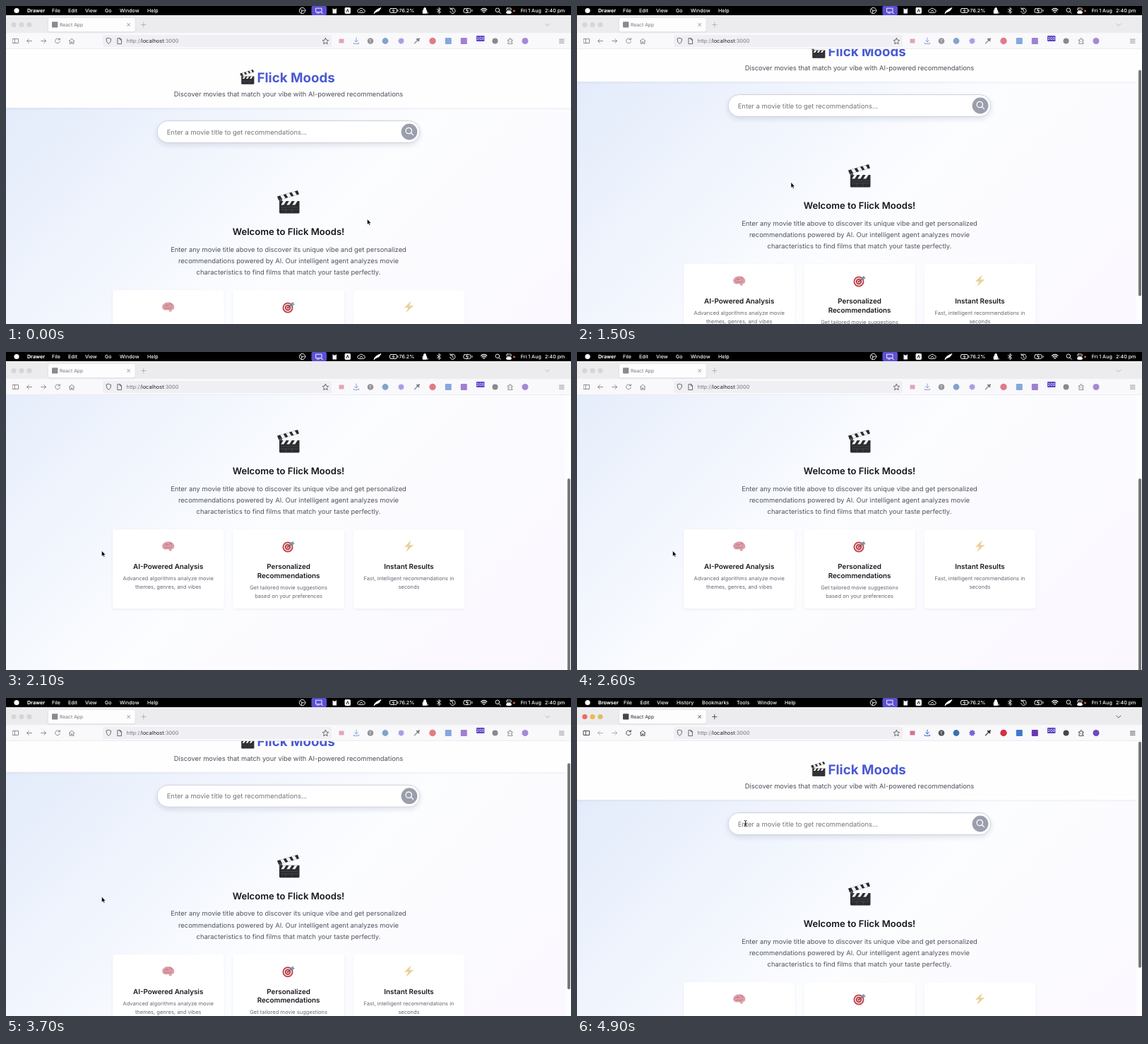
Write an HTML page that moves like this. It is 800x450 px and loops after 5000 ms.

```html
<!DOCTYPE html>
<html lang="en">
<head>
<meta charset="utf-8">
<title>React App</title>
<style>
html, body { margin: 0; width: 100%; height: 100%; overflow: hidden; background: #fff; }
svg { display: block; width: 100%; height: 100%; }
text { font-family: Inter, "Open Sans", sans-serif; white-space: pre; text-rendering: geometricPrecision; }
.mid { text-anchor: middle; }
.line { fill: none; stroke-linecap: round; stroke-linejoin: round; }
</style>
</head>
<body>
<svg id="stage" viewBox="0 0 800 450">
  <defs>
    <linearGradient id="sky" gradientUnits="userSpaceOnUse" x1="52" y1="9" x2="748" y2="705">
      <stop offset="0" stop-color="#e0e9fa"/>
      <stop offset=".5" stop-color="#fcfdff"/>
      <stop offset="1" stop-color="#faf6fe"/>
    </linearGradient>
    <filter id="soft" x="-20%" y="-20%" width="140%" height="160%">
      <feDropShadow dx="0" dy="1.2" stdDeviation="1.5" flood-color="#30406a" flood-opacity=".08"/>
    </filter>
    <filter id="lift" x="-10%" y="-30%" width="120%" height="200%">
      <feDropShadow dx="0" dy="3" stdDeviation="3" flood-color="#30406a" flood-opacity=".14"/>
    </filter>
    <clipPath id="slate"><path d="M3 15H31.5V20.5H3Z"/></clipPath>
    <clipPath id="arm"><path d="M0 8.5L29 0L31 5.5L2 14Z"/></clipPath>
    <symbol id="clapper" viewBox="0 0 32 33" overflow="visible">
      <path d="M3 15H31.5V31Q31.5 32.5 30 32.5H4.5Q3 32.5 3 31Z" fill="#2b2c2f"/>
      <path d="M0 8.5L29 0L31 5.5L2 14Z" fill="#292a2d"/>
      <g fill="#f2f2f2">
        <path clip-path="url(#slate)" d="M5 21L9 14.5H13L9 21ZM13 21L17 14.5H21L17 21ZM21 21L25 14.5H29L25 21Z"/>
        <path clip-path="url(#arm)" d="M3.5 6L8 5L13 13L8 14ZM11.5 4L16 2L21 10L16 11ZM19.5 1L24 0L29 8L24 9Z"/>
      </g>
      <path d="M2 13L7 11.5V15.5H3Z" fill="#55575b"/>
      <path class="line" d="M5 23.7H29.5M5 27H29.5M12 27V31M21 27V31" stroke="#5c5e62" stroke-width=".5"/>
    </symbol>
  </defs>

  <g id="page">
    <rect y="61" width="800" height="660" fill="url(#sky)"/>
    <rect x="-10" y="0" width="820" height="144" fill="#fefefe" filter="url(#soft)"/>
    <use href="#clapper" x="331" y="90" width="21" height="21"/>
    <text x="355.5" y="107.5" font-size="18.76" font-weight="700" fill="#4a5ad2">Flick Moods</text>
    <text class="mid" x="400" y="128.3" font-size="9.38" fill="#4a4f59">Discover movies that match your vibe with AI-powered recommendations</text>

    <rect x="214" y="162.5" width="372" height="31" rx="15.5" fill="#fff" stroke="#ced1db" filter="url(#lift)"/>
    <text x="227.7" y="181.6" font-size="9.42" fill="#747579">Enter a movie title to get recommendations...</text>
    <circle cx="571" cy="178" r="11.4" fill="#9b9eac"/>
    <path class="line" d="M574.5 176.5a4.2 4.2 0 1 1-8.4 0a4.2 4.2 0 1 1 8.4 0M573.4 179.5L576.5 182.6" stroke="#fff" stroke-width="1.3"/>

    <use href="#clapper" x="384" y="261" width="32" height="33"/>
    <text class="mid" x="400" y="324.4" font-size="13.1" font-weight="600" fill="#15171c">Welcome to Flick Moods!</text>
    <g id="intro" font-size="9.38" fill="#4f545e"></g>
    <g id="cards"></g>

    <g transform="translate(229.7 426)">
      <path d="M-8.5 .5C-9-4-4-7 0-6.8C5-7 8.8-3.5 8.6 0C8.8 3 6.5 4 5 4L4.6 6.8L1.5 6.3L.5 4C-4 5.2-8 4-8.5 .5Z" fill="#dfa0a9"/>
      <path class="line" d="M-6 0Q-4-3.5-2-2T2-3.5M-5 2.5Q-2 0 0 1.8T5 0M2-5.5Q6-4.5 5-2M-3-4.5L-1-2.7" stroke="#b2697a" stroke-width=".8"/>
    </g>
    <g transform="translate(399 427)">
      <circle r="7.5" fill="#c0424a"/><circle r="5.7" fill="#efe4e4"/>
      <circle r="4.2" fill="#c0424a"/><circle r="2.2" fill="#efe4e4"/><circle r="1.2" fill="#b52733"/>
      <path d="M0 0L6-5" stroke="#4f5360" stroke-width="1.1"/>
      <path d="M4-4L5-7L8-8L8-6L10-5L7-3Z" fill="#6f9cb5"/>
    </g>
    <path d="M573.5 417.5L563.8 427.3L569.5 426.5L566.3 434L577.5 423.7L571.5 424.5Z" fill="#ebd09a"/>
  </g>

  <g id="scrollbar">
    <rect x="791" y="61" width="9" height="389" fill="#fff" opacity=".6"/>
    <rect id="thumb" x="795" width="4" height="320" rx="2" fill="#77777a"/>
  </g>

  <g id="chrome">
    <rect y="13" width="800" height="25.5" fill="#ececee"/>
    <rect width="800" height="13" fill="#000"/>
    <rect y="38" width="800" height="22.5" fill="#f9f9fb"/>
    <path d="M0 60.5H800" stroke="#e9e9ed" stroke-width=".7"/>
    <rect x="60" y="17" width="122.5" height="19" rx="2.5" fill="#fdfdfe" filter="url(#soft)"/>
    <rect x="137" y="41" width="324" height="17" rx="2.5" fill="#f0f0f4"/>
    <g id="lights"></g>
    <path id="stripIcons" class="line" stroke="#36363f" stroke-width=".9" d="M191.5 26.5h6.5m-3.25-3.25v6.5M763.8 25.2l3 2.8l3-2.8"/>
    <g id="tools">
      <rect x="65" y="22.3" width="8.3" height="8.3" rx="1" fill="#45474d"/>
      <text x="76" y="29" font-size="6.8" fill="#24242b">React App</text>
      <path class="line" stroke="#36363f" stroke-width=".9" d="M171.8 24.7l3.6 3.6m0-3.6l-3.6 3.6
        M9.5 46.5h8v6h-8zM12.3 46.5v6M783.5 47.2h6.5m-6.5 2.5h6.5m-6.5 2.5h6.5
        M76 47.6a3.4 3.4 0 1 0 .4 2.6M76.3 45.5v2.3h-2.3M89.3 49.5l3.8-3.3l3.8 3.3M90.3 49v4.3h2v-2.5h1.6v2.5h2V49"/>
      <path class="line" id="arrows" stroke="#36363f" stroke-width=".9" d="M36.5 49.5h-6.8m2.8-2.8l-2.8 2.8l2.8 2.8M49.8 49.5h6.8m-2.8-2.8l2.8 2.8l-2.8 2.8"/>
      <path d="M471.5 46.5h7v6h-7z" fill="#d2738c"/>
      <path class="line" stroke="#496bd0" d="M496 45v6m-2.4-2.4l2.4 2.4l2.4-2.4M492.5 52v1.5h7V52"/>
      <circle cx="516" cy="49.5" r="4.3" fill="#55565b"/>
      <text class="mid" x="516" y="51.7" font-size="6" fill="#fff">T</text>
      <circle cx="537" cy="49.5" r="4.4" fill="#3c6fae"/>
      <circle cx="559.5" cy="49.5" r="3.4" fill="#7566d8" stroke="#7566d8" stroke-width="2" stroke-dasharray="1.3 1.3"/>
      <path class="line" d="M578.5 52.8l4.5-4.5" stroke="#53545b" stroke-width="1.5"/>
      <path class="line" d="M582 46.8l2.5 2.5m-1-1.5l1.5-1.5" stroke="#2c2d33" stroke-width="2"/>
      <circle cx="604" cy="49.5" r="4.7" fill="#d32f44"/>
      <rect x="621.8" y="45" width="9" height="9" rx="1" fill="#3f78cc"/>
      <rect x="643.8" y="45" width="9" height="9" rx="1" fill="#6a37b8"/>
      <circle cx="692.5" cy="49.5" r="4" fill="#4c4349"/>
      <path class="line" stroke="#46464f" stroke-width=".9" d="M710.8 47.8h2q-.8-2.3 1-2.3t1 2.3h2.2v2q-2-.7-2 1t2 1v1.7h-6.2v-2q1.8.2 1.8-1.1t-1.8-1z"/>
      <circle cx="735" cy="49.5" r="4.5" fill="#7047c2"/>
    </g>
    <path class="line" stroke="#46464f" stroke-width=".8" d="M452.4 45.4l1.3 2.7l3 .4l-2.2 2.1l.6 3l-2.7-1.4l-2.7 1.4l.6-3l-2.2-2.1l3-.4z
      M145.3 45.3l3.3 1.2q.2 5.3-3.3 7q-3.5-1.7-3.3-7zM158.3 45.6h3.2l2 2v6h-5.2zM161.3 45.6v2.2h2.2"/>
    <text x="170.5" y="52.2" font-size="7.45" fill="#77777d">http://<tspan fill="#25252c">localhost</tspan>:3000</text>
    <rect x="666" y="42" width="11.5" height="8" rx="1" fill="#5942c5"/>
    <text class="mid" x="671.8" y="48.3" font-size="5.8" fill="#fff">200</text>

    <circle cx="15" cy="6.5" r="3.6" fill="#fff"/>
    <g id="menu" font-size="7.1" font-weight="500" fill="#fff"></g>
    <rect x="432.5" y="0" width="21.5" height="13" rx="2" fill="#5d50d2"/>
    <g class="line" stroke="#fff" stroke-width=".9">
      <circle cx="419.5" cy="6.5" r="4.2"/><path d="M417 4l2 3l3-.5M419 7l-1 3"/>
      <path d="M439 3.2h8v5.5h-8zM440.5 10h3m3-.5l2 1"/>
      <rect x="480" y="2.5" width="7.5" height="8" rx="1" fill="#fff"/>
      <path d="M482 8.5l1.7-4l1.7 4" stroke="#000"/>
      <path d="M500 9.5a2.3 2.3 0 0 1 0-4.6q3-3.5 6 0a2.3 2.3 0 0 1 0 4.6zM501 8q2-4 4 0"/>
      <path d="M521 10.5q1-5 10-8q-2 5-7 6z" fill="#fff"/>
      <rect x="543.5" y="3.5" width="10" height="6" rx="1.5"/><path d="M549 4.5l-2 2.2h3l-2 2.2M555 5.5v2"/>
      <path d="M590.5 6h5v4.3h-5zM591.5 6V4a1.5 1.5 0 0 1 3 0v2M597 8.5v2" fill="#fff"/>
      <path d="M610.5 4.5l5 4l-2.5 2V2.5l2.5 2l-5 4M629.5 4.3a3.7 3.7 0 1 1-.8 3.2M629 2.5v2h2M632 4.5v2.5l1.5 1"/>
      <rect x="648" y="3.8" width="10" height="5.5" rx="1.3"/><path d="M653.5 3l-2 3.5h3l-2 3.5M660 5.5v2"/>
      <path stroke-width="1.2" d="M672.5 5.2q4.2-3.8 8.4 0M674 7q2.7-2.4 5.4 0M675.7 8.8q1-.8 2 0"/>
      <path d="M698.7 5.8a2.8 2.8 0 1 1-5.6 0a2.8 2.8 0 1 1 5.6 0M698 8l2.2 2.3"/>
      <rect x="708.5" y="3" width="7" height="3" rx="1.5"/><rect x="708.5" y="7.5" width="7" height="3" rx="1.5" fill="#fff"/>
    </g>
    <path d="M462.5 10.5V3l1.5 1.5h2.5L468 3v7.5Z" fill="#fff"/>
    <circle cx="719.5" cy="7" r="1.4" fill="#e5684d"/>
    <g font-size="7.1" font-weight="500" fill="#fff">
      <text x="556.5" y="9.1">76.2%</text>
      <text x="728.8" y="9.1">Fri 1 Aug</text>
      <text x="763" y="9.1">2:40 pm</text>
    </g>
  </g>

  <path id="arrow" d="M0 0V7.8L1.8 6.2L3 8.8L4.3 8.2L3.1 5.8H5.4Z" fill="#000" stroke="#fff" stroke-width=".5"/>
  <path id="beam" class="line" d="M-1.6-4Q0-4 0-3Q0-4 1.6-4M0-3V3M-1.6 4Q0 4 0 3Q0 4 1.6 4M-1 1H1" stroke="#111" stroke-width=".9"/>
</svg>

<script>
const el = id => document.getElementById(id);
const move = (node, x, y) => node.setAttribute('transform', `translate(${x} ${y})`);
const show = (node, visible) => node.setAttribute('visibility', visible ? 'visible' : 'hidden');
const fade = (id, opacity) => el(id).setAttribute('opacity', opacity);
const centered = (lines, x, y, step) => lines.map((line, i) =>
  `<text class="mid" x="${x}" y="${y + i * step}">${line}</text>`).join('');

el('intro').innerHTML = centered([
  'Enter any movie title above to discover its unique vibe and get personalized',
  'recommendations powered by AI. Our intelligent agent analyzes movie',
  'characteristics to find films that match your taste perfectly.'
], 400, 347.7, 16.2);

const cards = [
  [['AI-Powered Analysis'], ['Advanced algorithms analyze movie', 'themes, genres, and vibes']],
  [['Personalized', 'Recommendations'], ['Get tailored movie suggestions', 'based on your preferences']],
  [['Instant Results'], ['Fast, intelligent recommendations in', 'seconds']]
];
el('cards').innerHTML = cards.map(([title, body], i) => {
  const x = 229.7 + i * 170.4;
  return `<rect x="${x - 78.7}" y="402" width="157.4" height="112" rx="4.5" fill="#fff" filter="url(#soft)"/>
    <g font-size="9.85" font-weight="600" fill="#17191e">${centered(title, x, 458, 12.6)}</g>
    <g font-size="7.52" fill="#666b75">${centered(body, x, 461.5 + title.length * 12.6, 11.8)}</g>`;
}).join('');

const menus = {
  idle: [['Drawer', 30], ['File', 65], ['Edit', 88], ['View', 112], ['Go', 140], ['Window', 161], ['Help', 200]],
  active: [['Browser', 30], ['File', 66], ['Edit', 89.5], ['View', 113], ['History', 141], ['Bookmarks', 177],
    ['Tools', 226], ['Window', 255.5], ['Help', 294]]
};
let focus;
function setFocus(active) {
  if (focus === active) return;
  focus = active;
  el('menu').innerHTML = menus[active ? 'active' : 'idle'].map(([label, x], i) =>
    `<text x="${x}" y="9.1" font-weight="${i ? 500 : 700}">${label}</text>`).join('');
  const colors = active ? ['#ec6a5f', '#f1b84c', '#d5c267'] : ['#d6d6da', '#d6d6da', '#d6d6da'];
  el('lights').innerHTML = colors.map((c, i) => `<circle cx="${11 + i * 11}" cy="26.5" r="3.6" fill="${c}"/>`).join('');
  fade('tools', active ? 1 : .62);
  fade('stripIcons', active ? .9 : .3);
  fade('arrows', active ? .4 : 1);
}

// Keys are [ms, value, ...]; values between keys are interpolated.
const scrollKeys = [[1300, 0], [1400, 10], [1500, 37], [1600, 85], [1700, 132], [1800, 151], [2900, 151],
  [3000, 145], [3200, 108], [3400, 71], [3700, 39.3], [4000, 4], [4100, -.6], [4200, 0]];
const pointerKeys = [[1200, 511.5, 301.5], [1300, 470, 280], [1400, 385, 256], [1500, 303, 249.5],
  [1600, 222, 262], [1700, 162, 276], [1800, 135.5, 281.3], [4200, 135.5, 281.3],
  [4400, 173, 243], [4600, 225, 188], [4700, 238.5, 177.5]];

function sample(keys, t) {
  const next = keys.findIndex(k => k[0] > t);
  if (next === 0) return keys[0].slice(1);
  if (next < 0) return keys[keys.length - 1].slice(1);
  const a = keys[next - 1], b = keys[next], u = (t - a[0]) / (b[0] - a[0]);
  return a.slice(1).map((v, i) => v + (b[i + 1] - v) * u);
}

function draw(now) {
  const t = Math.floor(now % 5000 / 100) * 100;
  const [scroll] = sample(scrollKeys, t);
  const [x, y] = sample(pointerKeys, t);
  const overInput = x > 214 && x < 560 && y > 162 && y < 194;
  move(el('page'), 0, -scroll);
  show(el('scrollbar'), t >= 1300);
  el('thumb').setAttribute('y', 61.7 + Math.max(0, scroll) * .776);
  setFocus(t >= 4800);
  show(el('arrow'), !overInput);
  show(el('beam'), overInput);
  move(el(overInput ? 'beam' : 'arrow'), x, y);
}

const start = performance.now();
function tick() {
  draw(performance.now() - start);
  requestAnimationFrame(tick);
}
tick();
</script>
</body>
</html>
```
